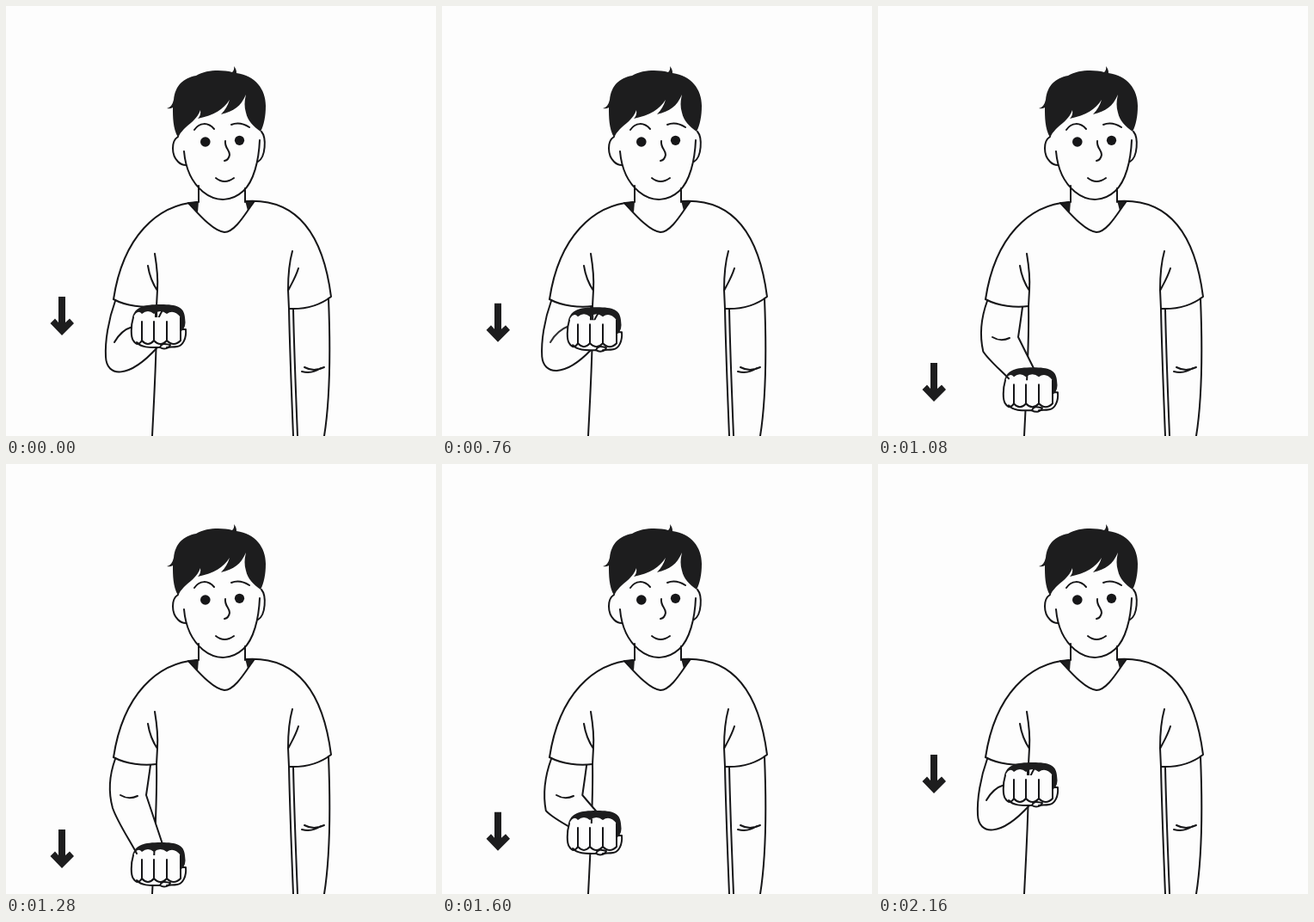
Write an HTML page with a canvas that moves like this. It is 500x500 px and loops after 3 s.

```html
<!DOCTYPE html>
<html lang="en">
<head>
<meta charset="utf-8">
<title>Fist moving down</title>
<style>
html, body { margin: 0; width: 100%; height: 100%; overflow: hidden; background: #fdfdfd; }
canvas { display: block; width: 100vw; height: 100vh; }
</style>
</head>
<body>
<canvas id="stage" width="500" height="500"></canvas>
<script>
const ctx = document.getElementById('stage').getContext('2d');
const PAPER = '#fdfdfd', INK = '#161618', DARK = '#1d1d1e';
const LOOP = 3000, STEP = 40;
const DOWN = 640, TURN = 1280, REST = 2160;
const ARROW_DROP = 87, HAND_DROP = 93;

const line = d => ctx.stroke(new Path2D(d));
const mix = (a, b, k) => a + (b - a) * k;

function fill(d, color) {
  ctx.fillStyle = color;
  ctx.fill(new Path2D(d));
}

function dot(x, y, r) {
  ctx.fillStyle = INK;
  ctx.beginPath();
  ctx.arc(x, y, r, 0, Math.PI * 2);
  ctx.fill();
}

function shifted(dy, draw) {
  ctx.save();
  ctx.translate(0, dy);
  draw();
  ctx.restore();
}

function faded(alpha, d) {
  ctx.globalAlpha = Math.max(0, Math.min(1, alpha));
  line(d);
  ctx.globalAlpha = 1;
}

function ease(t) {
  const n = 2.4;
  return t < 0.5 ? Math.pow(2 * t, n) / 2 : 1 - Math.pow(2 - 2 * t, n) / 2;
}

function progress(ms) {
  if (ms <= DOWN || ms >= REST) return 0;
  if (ms < TURN) return ease(Math.pow((ms - DOWN) / (TURN - DOWN), 0.84));
  return 1 - ease((ms - TURN) / (REST - TURN));
}

function head() {
  line('M224 209V228M278 212V228');
  line('M207 169C209 192 217 206 229 216C245 229 263 227 276 215C288 204 294 180 295 156');
  line('M200 152C192 157 192 173 200 181Q204 185 209 185');
  line('M297 146C303 153 302 176 293 181');
  fill('M187 119Q193 118 195 109C197 92 206 84 221 81C233 74 251 74 263 77Q266 74 265 70Q268 73 268 78' +
    'C290 81 302 97 302 116C302 128 300 138 296 146C288 140 281 134 279 124Q276 115 279 103' +
    'C273 117 265 122 250 126Q257 119 260 109C253 120 242 127 223 131Q227 127 226 121' +
    'C223 131 212 138 207 143Q202 148 200 153C194 142 194 129 194 118Q191 120 187 119Z', DARK);
  line('M219 144C225 135 235 135 242 143M262 138Q272 134 283 141');
  dot(231.8, 158, 5.8);
  dot(271.5, 156.3, 5.6);
  line('M255 157C254 165 260 167 260 173Q259 179 254 180');
  line('M244 200Q254 208 265 200');
}

function body() {
  fill('M211 229L224 227L223 240Z', DARK);
  fill('M278 226L290 227L281 238Z', DARK);
  line('M212 229C224 242 241 262 254 263C266 263 278 242 288 228');
  line('M222 228C176 231 136 268 125 341');
  line('M279 227C340 223 369 268 378 338C365 348 350 353 329 352');
  line('M173 288C175 300 177 315 176 330L175 349M165 302C167 315 172 325 176 331');
  line('M333 285C328 303 328 318 328 330L329 352M340 305C337 315 331 325 328 331');
  line('M175 349C176 390 173 440 170 500');
  line('M329 352C330 400 332 450 334 500M334 352C335 400 337 450 339 500');
  line('M375 340C377 390 378 450 370 500');
  line('M347 420Q358 426 370 420M344 425Q356 428 366 421');
}

// u runs from 0 (forearm raised) to 1 (arm down); the raised elbow bulges.
function arm(u) {
  const bulge = Math.pow(1 - u, 4);
  const ex = 116 + 8 * u, ey = 408 - 8 * u;
  const wx = 152 + 24 * bulge, wy = 397 + u * (100 - u * (160 - 116 * u));
  const outer = `M127 343C119 365 ${ex - 1 - 4 * u} ${ey - 18} ${ex} ${ey}` +
    `C${mix(ex, wx, 0.3) - 3 - 14 * bulge} ${mix(ey, wy, 0.3) + 27 * bulge} ` +
    `${mix(ex, wx, 0.7) - 16 * bulge} ${mix(ey, wy, 0.7) + 34 * bulge} ${wx} ${wy}`;

  const top = `${168 + 6 * bulge} 350`;
  const upper = `${166 + 8 * bulge} 365`;
  const bend = `${163 + 11 * bulge} 385`;
  const wrist = 352 + HAND_DROP * u;
  const lower = `171 ${mix(385, wrist, 0.4)}`;

  fill(`${outer}L183 ${wrist}Q${lower} ${bend}Q${upper} ${top}Z`, PAPER);
  line(outer);
  line(`M${top}Q${upper} ${bend}Q${lower} 183 ${wrist}`);

  const lift = 6 * Math.min(1, u * 6);
  faded(1 - u * 3.3, `M126 391C131 382 137 376 ${147 + lift} ${373 - lift}`);
  faded(u * 3.7 - 0.8, 'M133 385Q143 391 153 386');
  line('M125 341C140 349 160 351 175 349');
}

function hand() {
  const gaps = [203, 187, 172, 158, 148];
  let tips = 'M203 362V389', knuckles = 'L203 362';
  for (let i = 1; i < gaps.length; i++) {
    const x = gaps[i], mid = (x + gaps[i - 1]) / 2;
    tips += `Q${mid} 397 ${x} 389`;
    knuckles += `Q${mid} 352 ${x} ${i < 4 ? 358 : 362}`;
  }
  fill(tips + 'C145 385 145 372 148 362Z', PAPER);
  fill('M152 388H203L204 376H209C210 386 206 395 199 396C190 396 187 400 179 397C169 398 158 398 152 391Z', PAPER);
  line('M204 376H209C210 386 206 395 199 396C194 397 190 396 187 397M152 391C158 398 169 397 179 397');
  line('M179 397C181 391 186 393 191 394C190 398 184 400 179 397');
  line(tips + 'C145 385 145 372 148 362');
  for (const x of gaps.slice(1, 4)) line(`M${x} 367V389`);
  fill('M147 362C150 350 160 347 180 347C199 347 207 350 208 362Q210 374 204 378' + knuckles + 'Z', DARK);
}

function arrow() {
  fill('M61 338H69V368L74 363.5L79 369L65 383L51.5 369L57 363.5L61 368Z', DARK);
}

function draw(ms) {
  const p = progress(ms);
  // The fist starts slower than the arrow because the forearm swings.
  const u = p * (1 - (1 - p) * (0.65 + 0.36 * p));
  ctx.fillStyle = PAPER;
  ctx.fillRect(0, 0, 500, 500);
  ctx.strokeStyle = INK;
  ctx.lineWidth = 2;
  ctx.lineCap = ctx.lineJoin = 'round';
  head();
  body();
  arm(u);
  shifted(u * HAND_DROP, hand);
  shifted(p * ARROW_DROP, arrow);
}

const start = performance.now();
function tick() {
  const ms = (performance.now() - start) % LOOP;
  draw(Math.floor(ms / STEP) * STEP);
  requestAnimationFrame(tick);
}
tick();
</script>
</body>
</html>
```
